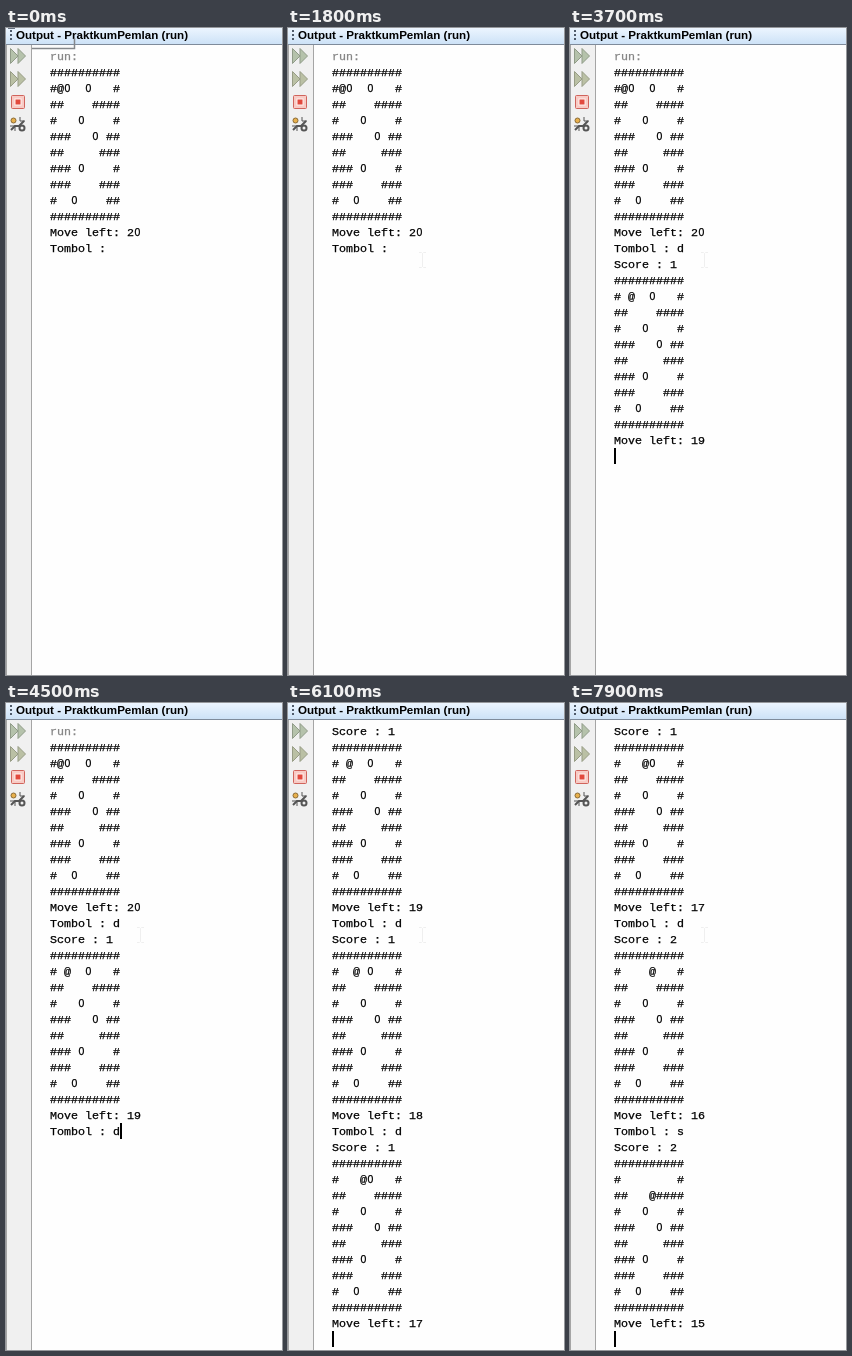
An HTML page for the animation above (8 s loop, 276 px wide and 647 px high).

```html
<!DOCTYPE html>
<html lang="en">
<head>
<meta charset="utf-8">
<title>Console game</title>
<style>
  html, body { margin: 0; width: 100%; height: 100%; overflow: hidden; background: #fefefe; }
  body { position: relative; }
  svg { position: absolute; left: 0; top: 0; }
  #title { font: bold 11.6px "Liberation Sans", Arial, sans-serif; }
  #console {
    position: absolute; left: 44px; top: 21px; margin: 0; color: #000;
    font: 11.667px/16px "Liberation Mono", "Courier New", monospace;
    -webkit-text-stroke: .25px;
  }
  #console b { font-weight: normal; color: #858585; }
  /* plain zero without the inner dot */
  #console i {
    display: inline-block; width: 7px; text-align: center;
    font: 10.5px/0 "Liberation Sans", Arial, sans-serif;
  }
  #caret { position: absolute; width: 2px; height: 16px; background: #000; }
</style>
</head>
<body>
<svg width="276" height="647" viewBox="0 0 276 647">
  <defs>
    <linearGradient id="bar" x2="0" y2="1">
      <stop stop-color="#ecf5ff"/><stop offset="1" stop-color="#cde2f7"/>
    </linearGradient>
    <path id="forward" d="M.5 .5V15.5L8 8zM8 .5V15.5L15.5 8z" stroke-linejoin="round"/>
  </defs>
  <rect y="16" width="26" height="631" fill="#f0f0f0"/>
  <path d="M.5 16V647M25.5 17V647" stroke="#a5a5a5"/>
  <rect width="276" height="16" fill="url(#bar)"/>
  <path d="M0 16.5H276" stroke="#7f8b9b"/>
  <path d="M5 2V13" stroke="#4f5b6b" stroke-width="2" stroke-dasharray="2"/>
  <text id="title" x="10" y="11">Output - PraktkumPemlan (run)</text>

  <use href="#forward" x="4" y="20" fill="#b5c2ab" stroke="#909b88"/>
  <use href="#forward" x="4" y="43" fill="#bac0a4" stroke="#979c85"/>
  <rect x="5.5" y="67.5" width="13" height="13" rx="1" fill="#f8cbc5" stroke="#d0645c"/>
  <rect x="9" y="71" width="6" height="6" fill="#e2493d" stroke="#fff1ef"/>
  <g fill="none" stroke="#555">
    <circle cx="7.5" cy="92.5" r="2.5" fill="#e8b04c" stroke="#8a6a35"/>
    <path d="M5 102L9 98H13L18 93" stroke-width="2"/>
    <path d="M14 89V93H19M4 98H9V103"/>
    <circle cx="16" cy="100" r="2.5" stroke-width="2"/>
  </g>

  <g id="tooltip">
    <rect x="26" y="17" width="41" height="3" fill="#fafafa"/>
    <path d="M26 20.5H68.5V10" fill="none" stroke="#85888c" stroke-width="1.5"/>
    <path d="M2 .5H9" stroke="#667080"/>
  </g>
  <path id="pointer" d="M-3.5 -7.5H-1L0 -6.5L1 -7.5H3.5M0 -6.5V6.5M-3.5 7.5H-1L0 6.5L1 7.5H3.5"
        fill="none" stroke="#efefef"/>
</svg>
<pre id="console"></pre>
<div id="caret"></div>

<script>
const LOOP = 8000, ROW = 16, COL = 7, TURN_ROWS = 13;
const PROMPT = "Tombol : ";
const MOVES = { d: [1, 0], s: [0, 1] };
const LEVEL = [
  "##########",
  "#@0  0   #",
  "##    ####",
  "#   0    #",
  "###   0 ##",
  "##     ###",
  "### 0    #",
  "###    ###",
  "#  0    ##",
  "##########",
];

// The player's turns: the prompt appears, a key is typed, the next board is printed.
const INPUTS = [
  { key: "d", prompt: 0, typed: 2700, done: 3700 },
  { key: "d", prompt: 3900, typed: 4400, done: 4800 },
  { key: "d", prompt: 5100, typed: 5700, done: 6100 },
  { key: "d", prompt: 6300, typed: 6400, done: 6800 },
  { key: "s", prompt: 7100, typed: 7500, done: 7900 },
];
const FOCUS_AT = 1400;   // the caret first shows
const ENTER_LEAD = 200;  // the caret jumps back this long before the next board
const CARET_ON = 400, BLINK = 900;

const $ = id => document.getElementById(id);

// Plays the game and returns the printed lines of each turn, without the prompt.
function playGame() {
  const grid = LEVEL.map(row => [...row]);
  let x = 1, y = 1, score = 0;
  const print = (heading, movesLeft) =>
    [heading, ...grid.map(row => row.join("")), `Move left: ${movesLeft}`];
  const boards = [print("run:", 20)];
  for (const { key } of INPUTS) {
    const [dx, dy] = MOVES[key];
    grid[y][x] = " ";
    x += dx;
    y += dy;
    if (grid[y][x] === "0") score++;
    grid[y][x] = "@";
    boards.push(print(`Score : ${score}`, 20 - boards.length));
  }
  return boards;
}

const boards = playGame();

// Prompt line, caret column and the time the caret last started to blink.
function promptState(t, input) {
  if (!input || t < input.prompt) return { line: "", column: 0, since: t };
  const column = PROMPT.length;
  if (t < input.typed) return { line: PROMPT, column, since: Math.max(input.prompt, FOCUS_AT) };
  const line = PROMPT + input.key;
  const enter = input.done - ENTER_LEAD;
  return t < enter
    ? { line, column: column + 1, since: input.typed }
    : { line, column, since: enter };
}

let shownHtml;
function drawConsole(t) {
  const turn = INPUTS.filter(input => input.done <= t).length;
  const first = Math.max(0, turn - 2);
  const { line, column, since } = promptState(t, INPUTS[turn]);
  const lines = [];
  for (let i = first; i <= turn; i++) {
    lines.push(...boards[i], i < turn ? PROMPT + INPUTS[i].key : line);
  }
  const html = lines.join("\n")
    .replace(/0/g, "<i>0</i>")
    .replace("run:", "<b>run:</b>");
  if (html !== shownHtml) $("console").innerHTML = shownHtml = html;

  const caret = $("caret").style;
  caret.display = t >= since && (t - since) % BLINK < CARET_ON ? "block" : "none";
  caret.left = 44 + column * COL + "px";
  caret.top = 20 + ((turn - first + 1) * TURN_ROWS - 1) * ROW + "px";
}

function drawPointer(t) {
  const p = Math.min(1, Math.max(0, (t - 100) / 300));
  const [x, y] = t < FOCUS_AT ? [40 + 100 * p, 24 + 207 * p] : [134, 232];
  $("pointer").setAttribute("transform", `translate(${Math.round(x) + 0.5} ${Math.round(y)})`);
  $("pointer").style.display = t < 100 ? "none" : "";
  $("tooltip").style.display = t < 100 ? "" : "none";
}

function frame() {
  const t = performance.now() % LOOP;
  drawConsole(t);
  drawPointer(t);
  requestAnimationFrame(frame);
}
frame();
</script>
</body>
</html>
```
